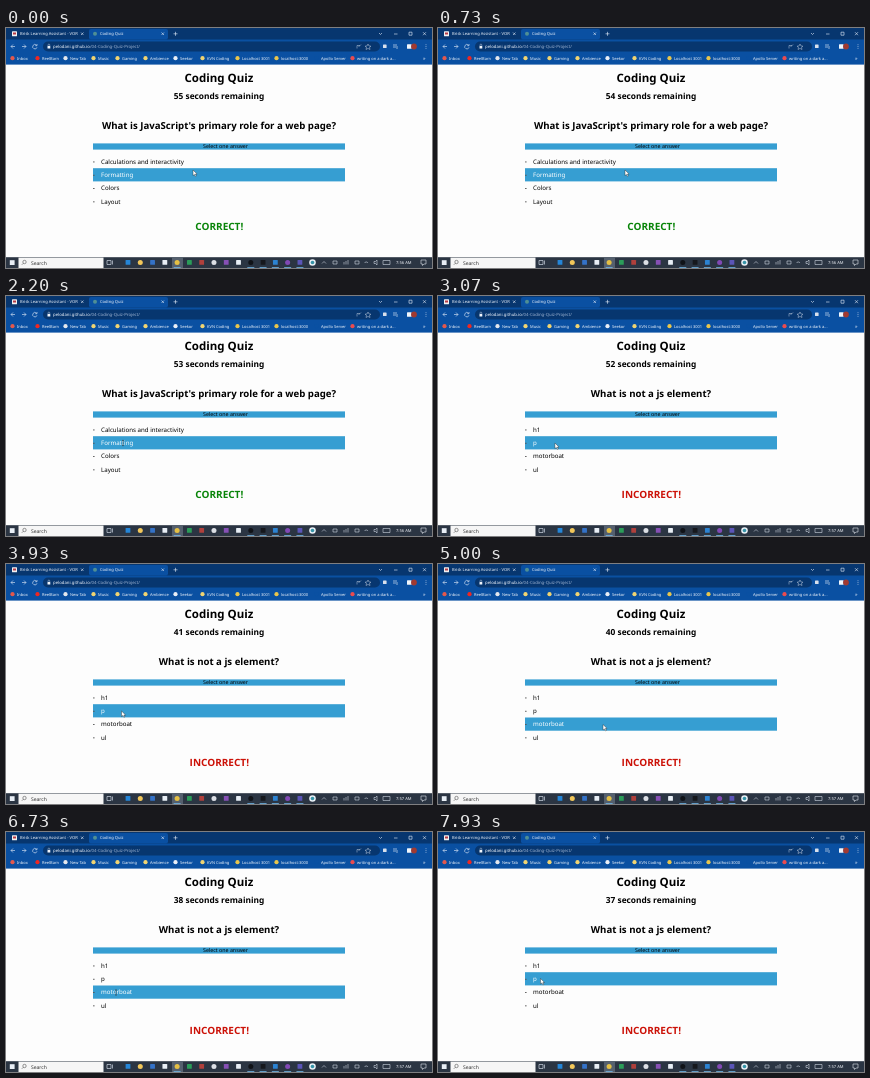
These frames come from a looping animation (426x240 px, 8 s). An HTML page:

```html
<!DOCTYPE html>
<html lang="en">
<head>
<meta charset="utf-8">
<title>Coding Quiz</title>
<style>
  html, body { margin: 0; width: 100%; height: 100%; overflow: hidden; background: #fdfdfd; }
  svg { display: block; width: 100vw; height: 100vh; font-family: "Noto Sans", sans-serif; text-rendering: geometricPrecision; }
  .mid { text-anchor: middle; }
  .bold { font-weight: 700; }
  #options { font-weight: 500; }
  #verdict { font-family: "Open Sans", sans-serif; }
</style>
</head>
<body>
<svg viewBox="0 0 426 240" preserveAspectRatio="none">
  <rect width="426" height="240" fill="#fdfdfd"/>
  <g id="browser"></g>
  <g id="taskbar"></g>
  <g id="quiz">
    <text class="mid bold" x="213" y="53.7" font-size="11.5">Coding Quiz</text>
    <text id="timer" class="mid bold" x="213" y="71.3" font-size="8.35"></text>
    <text id="question" class="mid bold" x="213" y="100.8" font-size="9.65"></text>
    <rect x="87" y="115.4" width="252" height="6.2" fill="#369ed2"/>
    <text class="mid" x="219.5" y="120.3" font-size="5.3">Select one answer</text>
    <rect id="hover" x="87" width="252" height="13.2" fill="#369ed2"/>
    <g id="options" font-size="6.15"></g>
    <text id="verdict" class="mid bold" x="213.3" y="201.8" font-size="10"></text>
  </g>
  <path id="arrow" d="M0 0V5.6L1.4 4.4L2.4 6.4L3.3 6L2.4 4H4.1Z" fill="#fff" stroke="#222" stroke-width=".4"/>
  <path id="beam" d="M-1 -2.6H1M0 -2.6V2.6M-1 2.6H1" fill="none" stroke="#333" stroke-width=".5"/>
</svg>
<script>
const byId = id => document.getElementById(id);

function add(parent, tag, attrs, text = "") {
  const node = document.createElementNS("http://www.w3.org/2000/svg", tag);
  for (const key in attrs) node.setAttribute(key, attrs[key]);
  node.textContent = text;
  return parent.appendChild(node);
}
const box = (parent, x, y, width, height, fill, rx = 0) => add(parent, "rect", { x, y, width, height, fill, rx });
const dot = (parent, cx, cy, r, fill) => add(parent, "circle", { cx, cy, r, fill });
const line = (parent, d, stroke = "#e6eefa", width = .6) =>
  add(parent, "path", { d, stroke, "stroke-width": width, fill: "none" });
const label = (parent, x, y, size, fill, text) => add(parent, "text", { x, y, "font-size": size, fill }, text);

function drawBrowser() {
  const g = byId("browser"), pale = "#f0f5fc";
  box(g, 0, 0, 426, 36.6, "#0a50a2");
  box(g, 0, 0, 426, 11.5, "#07366f");
  box(g, 83, 1, 79, 10.6, "#0a50a2", 2);
  box(g, 6, 3.2, 5, 5, "#f1f1f1", .5);
  box(g, 7, 4.5, 3, 2, "#b63a45");
  label(g, 14, 7.4, 4.1, pale, "Brisk Learning Assistant - VOR");
  dot(g, 89, 5.8, 2, "#4f8f95");
  label(g, 94, 7.4, 4.1, pale, "Coding Quiz");
  line(g, "M75 4.5L77.5 7M77.5 4.5L75 7M155.5 4.5L158 7M158 4.5L155.5 7M167.5 5.8H171.5M169.5 3.8V7.8");
  line(g, "M373 5L374.5 6.5L376 5M388 6H391.5M403 4.2H406V7.2H403ZM417 4.2L420 7.2M420 4.2L417 7.2");

  line(g, "M9 18.5H5M7 16.5L5 18.5L7 20.5M16 18.5H20M18 16.5L20 18.5L18 20.5");
  line(g, "M30.5 17.2A2.2 2.2 0 1 0 31 19.3M31 16V17.7H29.3");
  box(g, 37, 13.5, 337, 10, "#07366f", 5);
  box(g, 41.5, 18, 2.8, 2.6, pale, .3);
  line(g, "M42 18V17A.9 .9 0 0 1 43.8 17V18", pale, .4);
  label(g, 47, 20, 4.3, pale, "pelodani.github.io");
  label(g, 84, 20, 4.3, "#9fb4d2", "/04-Coding-Quiz-Project/");
  line(g, "M351 20.5V17.5H354M352.5 19L355 16.5M362 16L363 18L365 18.2L363.5 19.5L364 21.5L362 20.4L360 21.5L360.5 19.5L359 18.2L361 18Z", pale, .4);
  box(g, 377, 16.5, 3.6, 3.6, "#d8e0ec", .6);
  line(g, "M387 17H391M387 19H390M391 18V21", pale, .6);
  box(g, 401, 16.2, 4.6, 4.6, pale, .5);
  dot(g, 408, 18.5, 2.9, "#a03a32");
  [16.8, 18.5, 20.2].forEach(y => dot(g, 420, y, .45, pale));

  const bookmarks = [
    [11, "Inbox", "#e2584d"], [36, "ReelBarn", "#ee2722"], [64, "New Tab", "#e3e7ed"],
    [92, "Music", "#f0d472"], [116, "Gaming", "#f0d472"], [144, "Ambience", "#f0d472"],
    [174, "Seekor", "#e9eef6"], [201, "KVN Coding", "#f0d472"], [236, "Localhost 3001", "#e8c54c"],
    [275, "localhost:3000", "#e8c54c"], [315, "Apollo Server", "#0a50a2"], [351, "writing on a dark a...", "#e94b4f"]
  ];
  for (const [x, text, color] of bookmarks) {
    dot(g, x - 4.5, 30.2, 2.1, color);
    label(g, x, 31.7, 4, pale, text);
  }
  label(g, 417, 32, 5, pale, "»");
}

function drawTaskbar() {
  const g = byId("taskbar");
  box(g, 0, 229.2, 426, 10.8, "#2b3543");
  box(g, 3.8, 232.2, 4.8, 4.8, "#e8eef5");
  box(g, 12.5, 229.6, 85, 10.4, "#f6f6f6");
  add(g, "circle", { cx: 18.5, cy: 234, r: 1.7, fill: "none", stroke: "#333", "stroke-width": .5 });
  line(g, "M17.3 235.3L15.8 236.8", "#333", .5);
  label(g, 25, 236.6, 5, "#333", "Search");
  line(g, "M101 232.5H105V236.5H101ZM106.5 232.5V236.5");

  const apps = ["#2586d8", "#f2c75a", "#3472c8", "#e8eef5", "#e5c044", "#2b9d59", "#b0403c", "#dcdfe5",
    "#8750b5", "#e8eef5", "#101318", "#16181d", "#2c83d2", "#8149b5", "#5b55b8"];
  box(g, 166, 229.2, 11, 10.8, "#55606e");
  apps.forEach((color, i) => {
    const x = 122 + i * 12.28;
    if (i % 3 === 1) dot(g, x, 234.4, 2.5, color);
    else box(g, x - 2.4, 232, 4.8, 4.8, color, .6);
    if (i === 4 || i > 9) box(g, x - 3.5, 239.2, 7, .8, "#6fb6e8");
  });
  dot(g, 306.5, 234.5, 3.3, "#e8eff5");
  dot(g, 306.5, 234.5, 1.8, "#3694a8");
  line(g, "M316 235.5L318 233.5L320 235.5M327 233H331V236H327ZM338 236.5V234M340 236.5V233M342 236.5V232M349 233H353V236H349ZM358.5 235A2 2 0 0 1 362 235M368 233.5H369.5L371 232V237L369.5 235.5H368ZM377 232.5H384V236.5H377Z", "#dce4ef", .55);
  label(g, 390, 236, 4.1, "#f1f4f9", "").id = "clock";
  line(g, "M415 232H420V236H418L416.5 237.5V236H415Z", "#eef3fa", .55);
}

const ROW_TOP = 126.9, ROW_STEP = 13.3;
const LOOP = 8000, ANSWER_AT = 3000;
const FIRST_TICK = 470;

const pages = [
  { question: "What is JavaScript's primary role for a web page?", verdict: "CORRECT!", color: "#088408", clock: "7:56 AM",
    options: ["Calculations and interactivity", "Formatting", "Colors", "Layout"] },
  { question: "What is not a js element?", verdict: "INCORRECT!", color: "#cc1208", clock: "7:57 AM",
    options: ["h1", "p", "motorboat", "ul"] }
];

// Pointer stops: time, x, y
const stops = [
  [0, 187, 142], [1000, 187, 142], [1700, 117, 147], [3000, 117, 147], [3500, 115.5, 147],
  [4200, 115.5, 147], [4700, 165, 160.5], [5300, 165, 160.5], [6200, 110, 160.5],
  [7100, 110, 160.5], [7600, 102.5, 146.5], [LOOP, 102.5, 146.5]
];

function pointerAt(time) {
  const i = stops.findIndex(stop => stop[0] > time);
  const [t0, x0, y0] = stops[i - 1], [t1, x1, y1] = stops[i];
  const p = (time - t0) / (t1 - t0), eased = p * p * (3 - 2 * p);
  return [x0 + (x1 - x0) * eased, y0 + (y1 - y0) * eased];
}

function secondsAt(time) {
  const ticks = Math.floor((time - FIRST_TICK) / 1000) + 1;
  const lastTick = FIRST_TICK + (ticks - 1) * 1000;
  return 55 - ticks - (lastTick >= ANSWER_AT ? 10 : 0); // a wrong answer costs ten seconds
}

drawBrowser();
drawTaskbar();
const rows = pages[0].options.map((_, i) => {
  const y = ROW_TOP + i * ROW_STEP + 8.7;
  box(byId("options"), 87, y - 2.1, 1.6, .9, "#555");
  return label(byId("options"), 95, y, 6.15, "#000", "");
});

function setText(node, text) {
  if (node.textContent !== text) node.textContent = text;
}

function render(now) {
  const time = now % LOOP;
  const page = pages[time < ANSWER_AT ? 0 : 1];
  const [x, y] = pointerAt(time);
  const active = Math.floor((y - ROW_TOP) / ROW_STEP);

  setText(byId("timer"), `${secondsAt(time)} seconds remaining`);
  setText(byId("question"), page.question);
  setText(byId("verdict"), page.verdict);
  byId("verdict").setAttribute("fill", page.color);
  setText(byId("clock"), page.clock);
  byId("hover").setAttribute("y", ROW_TOP + active * ROW_STEP);
  rows.forEach((row, i) => {
    setText(row, page.options[i]);
    row.setAttribute("fill", i === active ? "#fff" : "#000");
  });

  const overText = x < 95 + rows[active].getComputedTextLength();
  byId("arrow").setAttribute("visibility", overText ? "hidden" : "visible");
  byId("beam").setAttribute("visibility", overText ? "visible" : "hidden");
  for (const id of ["arrow", "beam"]) byId(id).setAttribute("transform", `translate(${x} ${y})`);
  requestAnimationFrame(() => render(performance.now()));
}
render(0);
</script>
</body>
</html>
```
